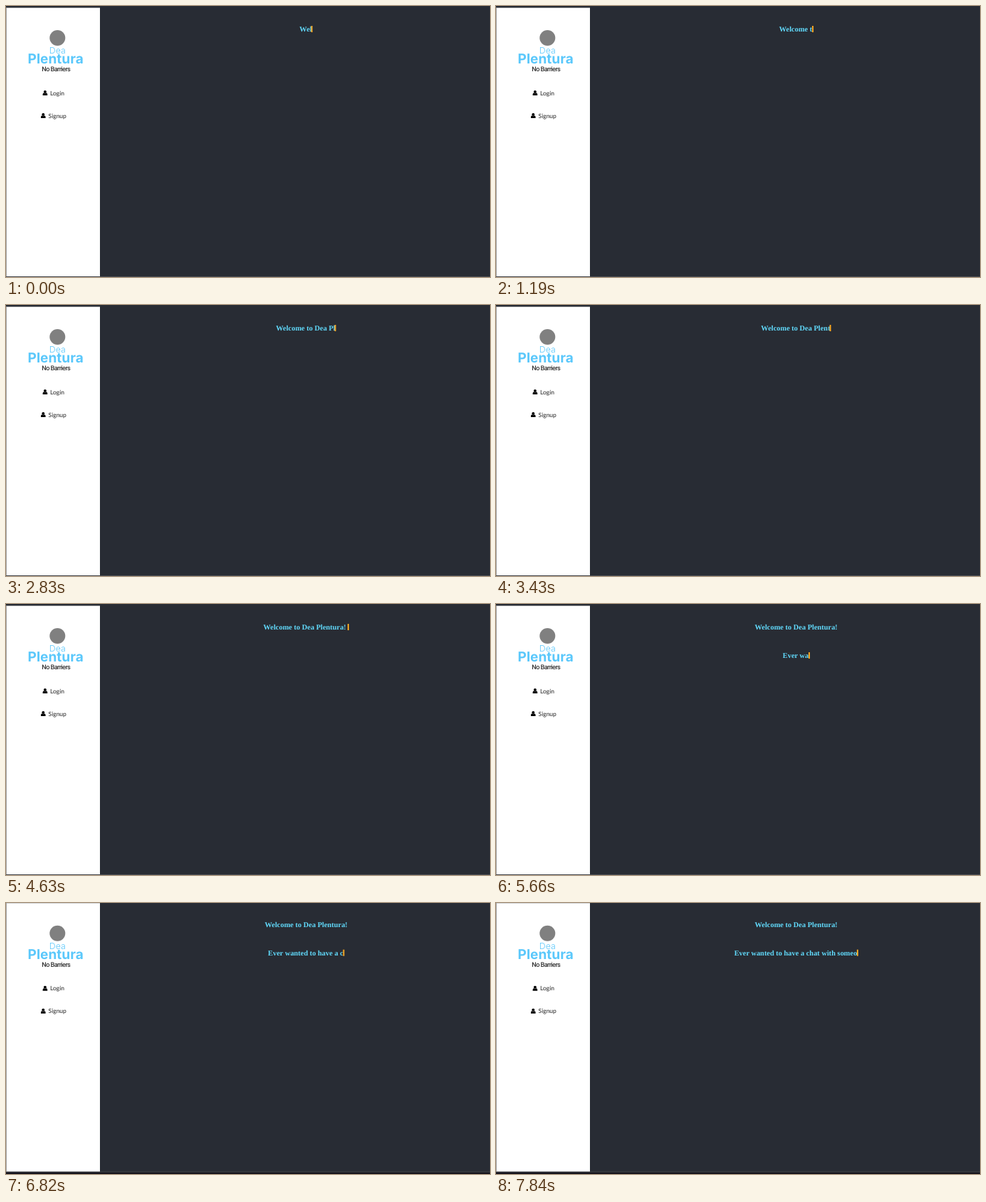
An HTML page for the animation above (7.99 s loop, 680 by 382 pixels).

```html
<!DOCTYPE html>
<html lang="en">
<head>
<meta charset="utf-8">
<title>Typed welcome</title>
<style>
  html, body { margin: 0; width: 100%; height: 100%; overflow: hidden; background: #282c34; }
  #stage { position: relative; width: 680px; height: 382px; overflow: hidden; background: #282c34; }
  #page { position: absolute; inset: 0; }
  svg { position: absolute; left: 0; top: 0; overflow: visible; }
  svg text { text-rendering: geometricPrecision; }
  .brand { fill: #5bc8fb; font-family: Inter, sans-serif; text-anchor: middle; }
  .tag { fill: #333; font: 500 9.2px Roboto, sans-serif; letter-spacing: -.6px; text-anchor: middle; }
  .link { fill: #222; font: 8.5px Lato, sans-serif; }
  .line {
    position: absolute; left: 421.7px; transform: translateX(-50%);
    white-space: pre; color: #61dafb; text-rendering: geometricPrecision;
    font: bold 10.4px/13px "Liberation Serif", "Times New Roman", serif;
  }
  #line1 { top: 27px; }
  #line2 { top: 66.5px; }
  .caret {
    display: inline-block; width: 2px; height: 9px;
    margin-left: -.6px; vertical-align: -1px; background: #f5a623;
  }
</style>
</head>
<body>
<div id="stage">
  <div id="page">
    <svg width="680" height="382">
      <defs>
        <g id="user">
          <circle cx="3.3" cy="2" r="2"/>
          <path d="M0 7V5.6Q0 3.6 1.7 3.5Q3.3 4.9 4.9 3.5Q6.6 3.6 6.6 5.6V7Z"/>
        </g>
      </defs>
      <rect y="2.5" width="132" height="378.5" fill="#fff"/>
      <rect y="2.5" width="0.7" height="378.5" fill="#777"/>
      <rect y="381" width="680" height="1" fill="#4a4d52"/>
      <rect y="382" width="680" height="6" fill="#15131c"/>
      <circle cx="72.3" cy="45" r="11" fill="#808080"/>
      <text class="brand" x="72.3" y="67.3" font-size="12.3" font-weight="300">Dea</text>
      <text class="brand" x="69.7" y="81.4" font-size="19.1" font-weight="700">Plentura</text>
      <text class="tag" x="70.2" y="92">No Barriers</text>
      <use href="#user" x="51.6" y="119"/>
      <text class="link" x="62" y="125.6">Login</text>
      <use href="#user" x="49" y="151"/>
      <text class="link" x="59.6" y="157.6">Signup</text>
    </svg>
    <div class="line" id="line1"><span></span><i class="caret"></i></div>
    <div class="line" id="line2"><span></span><i class="caret"></i></div>
  </div>
</div>
<script>
  const LOOP = 7990, LINE2_AT = 5145;
  const page = document.getElementById('page');

  function typer(id, text, start, step, end) {
    const [span, caret] = document.getElementById(id).children;
    return t => {
      const n = Math.max(0, Math.floor((t - start) / step));
      const done = t >= end;
      span.textContent = done ? text.trimEnd() : text.slice(0, n);
      caret.style.display = t < start || done ? 'none' : '';
    };
  }

  const lines = [
    typer('line1', 'Welcome to Dea Plentura!   ', -670, 205, LINE2_AT),
    typer('line2', 'Ever wanted to have a chat with someone', LINE2_AT, 72.5, Infinity)
  ];

  function draw() {
    const t = performance.now() % LOOP;
    lines.forEach(show => show(t));
    const scroll = Math.min(1, Math.max(0, (t - 6150) / 500));
    page.style.transform = `translateY(${-2.3 * scroll}px)`;
    requestAnimationFrame(draw);
  }
  draw();
</script>
</body>
</html>
```
